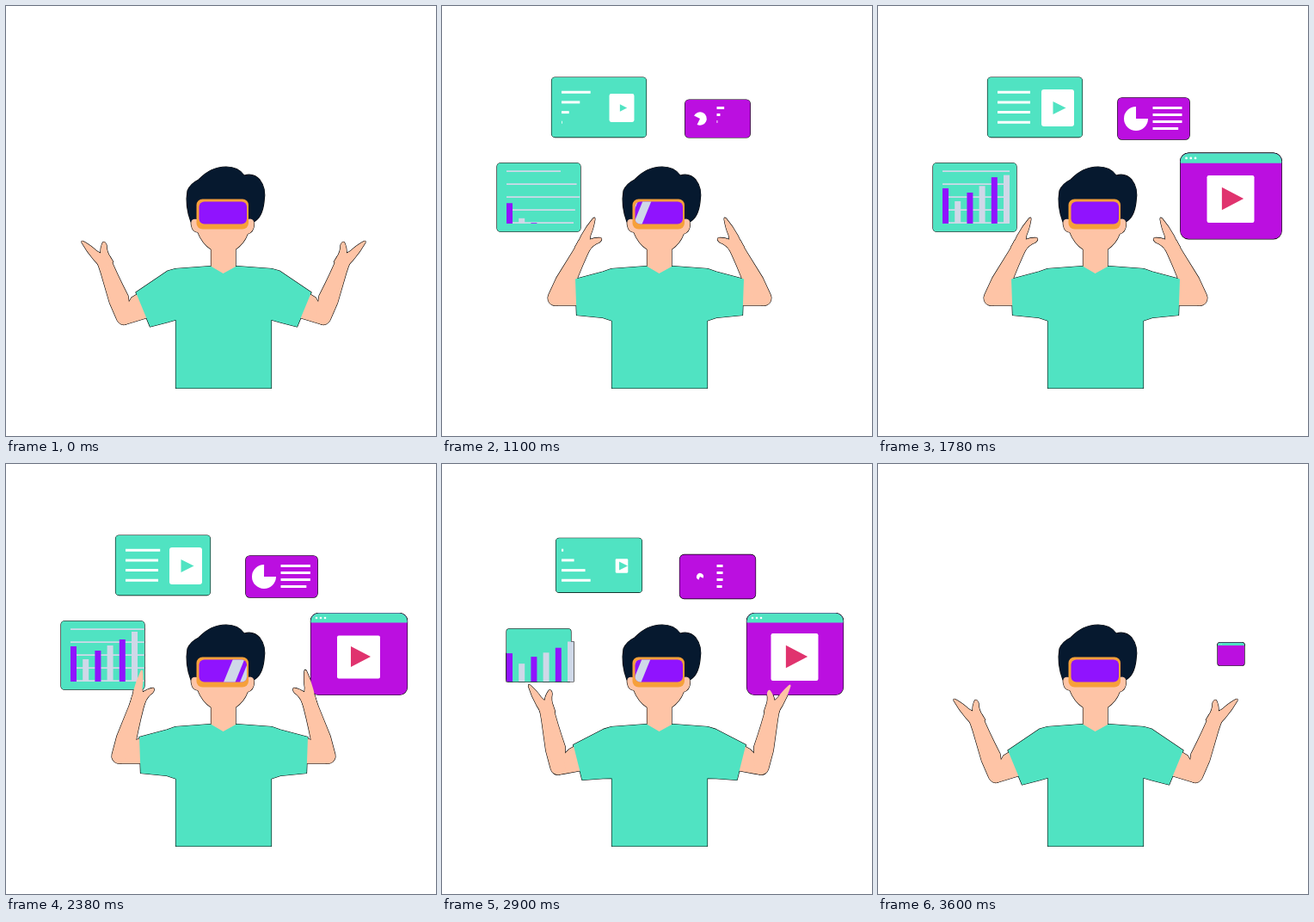
Write an HTML page with a canvas that moves like this. It is 500 by 500 pixels and loops after 3620 ms.

```html
<!DOCTYPE html>
<html lang="en">
<head>
<meta charset="utf-8">
<title>VR headset panels</title>
<style>
  html, body { margin: 0; width: 100%; height: 100%; overflow: hidden; background: #fff; }
  canvas { display: block; width: 500px; height: 500px; }
</style>
</head>
<body>
<canvas id="stage" width="500" height="500"></canvas>
<script>
const ctx = document.getElementById('stage').getContext('2d');
const LOOP = 3620;
const MINT = '#50e3c2', VIOLET = '#bb0fe0', PURPLE = '#9013fe', PALE = '#cfd8e8',
      SKIN = '#fec4a6', HAIR = '#06192f', ORANGE = '#f6a03a', PINK = '#e0336e', WHITE = '#fff';

const HAIR_PATH = new Path2D('M215 251Q208 232 211 215Q214 207 224 202Q238 187 256 187Q270 187 277 197' +
  'Q288 194 295 202Q303 212 300 228Q298 246 288 251H280V226H223V251Z');
const FACE_PATH = new Path2D('M222 248Q214 246 215.500 255Q217 263 223 263Q228 276 238.500 283V318H267V283' +
  'Q277 276 281 265Q288 263 288.500 254Q288.500 246 281 248Z');
// Forearm turns about the elbow, hand about the wrist.
const FOREARM = new Path2D('M-8.500-4L-8.500-22L-4-58Q-3-66-3.200-72H13Q12.500-50 14.500-21L8.500 0A8.500 8.500 0 0 1-8.500 0Z');
const HAND = new Path2D('M-8.500 8L-8.500 3Q-8.500-2-9.300-8Q-10-20-8.200-32Q-7-35-5.600-32Q-1.500-22-.5-14L1.500-9' +
  'Q6-15 11.500-17.500Q14.500-17 12.800-12Q8-6 7.700 2L7 8Z');

const PANELS = [
  { x: 112.5, y: 222.5, w: 97, h: 79.5, r: 4, start: 0, out: 2520, color: MINT },
  { x: 182.5, y: 117.8, w: 110, h: 69.5, r: 4, start: 322, out: 2568, color: MINT },
  { x: 320.5, y: 131, w: 83.5, h: 48.5, r: 5, start: 735, out: 2640, color: VIOLET },
  { x: 410.5, y: 221, w: 112, h: 95, r: 9, start: 1180, out: 3065, color: VIOLET }
];

const ramp = (t, a, b) => {
  const u = Math.min(1, Math.max(0, (t - a) / (b - a)));
  return u * u * (3 - 2 * u);
};
const mix = (a, b, k) => a + (b - a) * k;

// Grow with an overshoot, later swell and shrink away.
const pop = (t, start, out) =>
  1.1 * ramp(t, start, start + 500) - 0.1 * ramp(t, start + 500, start + 700) +
  0.1 * ramp(t, out, out + 200) - 1.1 * ramp(t, out + 200, out + 700);

let shapes = [];
const add = (path, color) => shapes.push([path, color]);

function box(x, y, w, h, r, color) {
  if (w < 0.3 || h < 0.3) return;
  const p = new Path2D();
  p.roundRect(x, y, w, h, r);
  add(p, color);
}

const centered = (x, y, w, h, r, s, color) =>
  box(x - w * s / 2, y - h * s / 2, w * s, h * s, r * s, color);

function place(path, color, matrix) {
  const p = new Path2D();
  p.addPath(path, matrix || new DOMMatrix());
  add(p, color);
}

function poly(points, color, matrix) {
  const p = new Path2D();
  points.forEach(([x, y]) => p.lineTo(x, y));
  p.closePath();
  place(p, color, matrix);
}

function triangle(x, y, w, h, s, color) {
  if (s > 0.02) poly([[x - w * s / 2, y - h * s / 2], [x + w * s / 2, y], [x - w * s / 2, y + h * s / 2]], color);
}

function chart(t) {
  for (let i = 0; i < 5; i++)
    box(75, 251.2 - 15 * i, 78 * pop(t, 362 + 102 * i, 2200), 1.7, 0, PALE);
  [41, 26, 36, 42, 49, 58].forEach((h, i) => {
    const bar = h * pop(t, 842 + 109 * i, 2530);
    box(75 + 14.2 * i, 253 - bar, 7, bar, 0, i % 2 ? PALE : PURPLE);
  });
}

function article(t) {
  [2270, 2400, 2505, 2560].forEach((out, i) =>
    box(139, 98.7 + 11.7 * i, 38 * pop(t, 742 + 106 * i, out), 3, 0, WHITE));
  centered(209, 118.5, 38, 43, 3, pop(t, 785, 2400), WHITE);
  triangle(211, 118.5, 15, 15, pop(t, 850, 2485), MINT);
}

function pie(t) {
  const s = pop(t, 850, 2368);
  if (s > 0.02) {
    const p = new Path2D(), a = (s - 1) * 6;
    p.moveTo(300, 131);
    p.arc(300, 131, 14 * s, a, a + Math.PI * 1.5);
    p.closePath();
    add(p, WHITE);
  }
  for (let i = 0; i < 4; i++)
    box(319.5, 117 + 8 * i, (i < 3 ? 34 : 29.5) * pop(t, 945 + 55 * i, 2340), 3, 0, WHITE);
}

function player(t, s) {
  const { x, y, w, h, r } = PANELS[3];
  if (s < 0.02) return;
  const bar = new Path2D();
  bar.roundRect(x - w * s / 2, y - h * s / 2, w * s, 11 * s, [r * s, r * s, 0, 0]);
  add(bar, MINT);
  for (let i = 0; i < 3; i++) {
    const dot = new Path2D();
    dot.arc(x + (5 * i - 49.5) * s, y - 42 * s, 1.3 * s, 0, 7);
    add(dot, WHITE);
  }
  centered(410, 224.5, 50, 50, 2, pop(t, 1280, 2700), WHITE);
  triangle(412.5, 224, 23, 24, pop(t, 1290, 2700), PINK);
}

function arm(raise, angle, mirror) {
  const at = (x0, y0, x1, y1) => [mix(x0, x1, raise), mix(y0, y1, raise)];
  const side = mirror ? new DOMMatrix([-1, 0, 0, 1, 506, 0]) : new DOMMatrix();
  const [ex, ey] = at(137, 362, 131.5, 339.7);
  poly([[ex, ey + 8.5], at(143, 369, 138, 348.2), at(166, 362, 160, 348.2),
        at(156, 333, 158, 318), at(146, 339, 151, 321), [ex, ey - 8]], SKIN, side);
  const fore = side.translate(ex, ey).rotate(9 + 0.9 * (angle - 9));
  place(FOREARM, SKIN, fore);
  place(HAND, SKIN, fore.translate(5.5, -70).rotate(0.4 * (angle - 9)));
}

function shirt(raise) {
  const at = (x0, y0, x1, y1) => [mix(x0, x1, raise), mix(y0, y1, raise)];
  const left = [[238, 302.5], [197, 305.5], at(188, 308, 187, 309), at(151, 333, 155, 317.5),
                at(167.5, 373, 156.5, 359.5), at(187, 368, 187, 362.5), at(197.5, 365, 197.5, 366), [197.5, 444.5]];
  const right = left.map(([x, y]) => [506 - x, y]).reverse();
  poly([[252.5, 311], ...left, ...right], MINT);
}

// A wide and a narrow reflection cross the visor from right to left.
function shine(t) {
  const x = 263 - 0.097 * (t % 1790 - 600);
  const strip = (left, w) => {
    ctx.beginPath();
    ctx.moveTo(left, 227);
    ctx.lineTo(left + w, 227);
    ctx.lineTo(left + w - 11, 254);
    ctx.lineTo(left - 11, 254);
    ctx.fill();
  };
  ctx.save();
  ctx.beginPath();
  ctx.roundRect(224.5, 227.5, 55.5, 26, 6);
  ctx.clip();
  ctx.fillStyle = PALE;
  strip(x, 13.5);
  strip(x + 19, 10);
  ctx.restore();
}

function draw(t) {
  shapes = [];
  const content = [chart, article, pie, player];
  PANELS.forEach((p, i) => {
    const s = pop(t, p.start, p.out);
    centered(p.x, p.y, p.w, p.h, p.r, s, p.color);
    content[i](t, s);
  });

  const raise = ramp(t, 0, 600) - ramp(t, 2400, 3300);
  const angle = -27 + 53.5 * (ramp(t, 0, 975) - ramp(t, 2041, 3210));
  arm(raise, angle, false);
  arm(raise, angle, true);
  add(HAIR_PATH, HAIR);
  add(FACE_PATH, SKIN);
  shirt(raise);
  box(221.5, 224.5, 60.5, 35, 7, ORANGE);
  box(224.5, 227.5, 55.5, 26, 6, PURPLE);

  ctx.fillStyle = WHITE;
  ctx.fillRect(0, 0, 500, 500);
  // All strokes go below all fills, so only the outer silhouette keeps its edge.
  ctx.strokeStyle = '#000';
  ctx.lineWidth = 1.2;
  ctx.lineJoin = 'round';
  shapes.forEach(([path]) => ctx.stroke(path));
  shapes.forEach(([path, color]) => {
    ctx.fillStyle = color;
    ctx.fill(path);
  });
  shine(t);
}

const begin = performance.now();
function frame() {
  draw((performance.now() - begin) % LOOP);
  requestAnimationFrame(frame);
}
frame();
</script>
</body>
</html>
```
